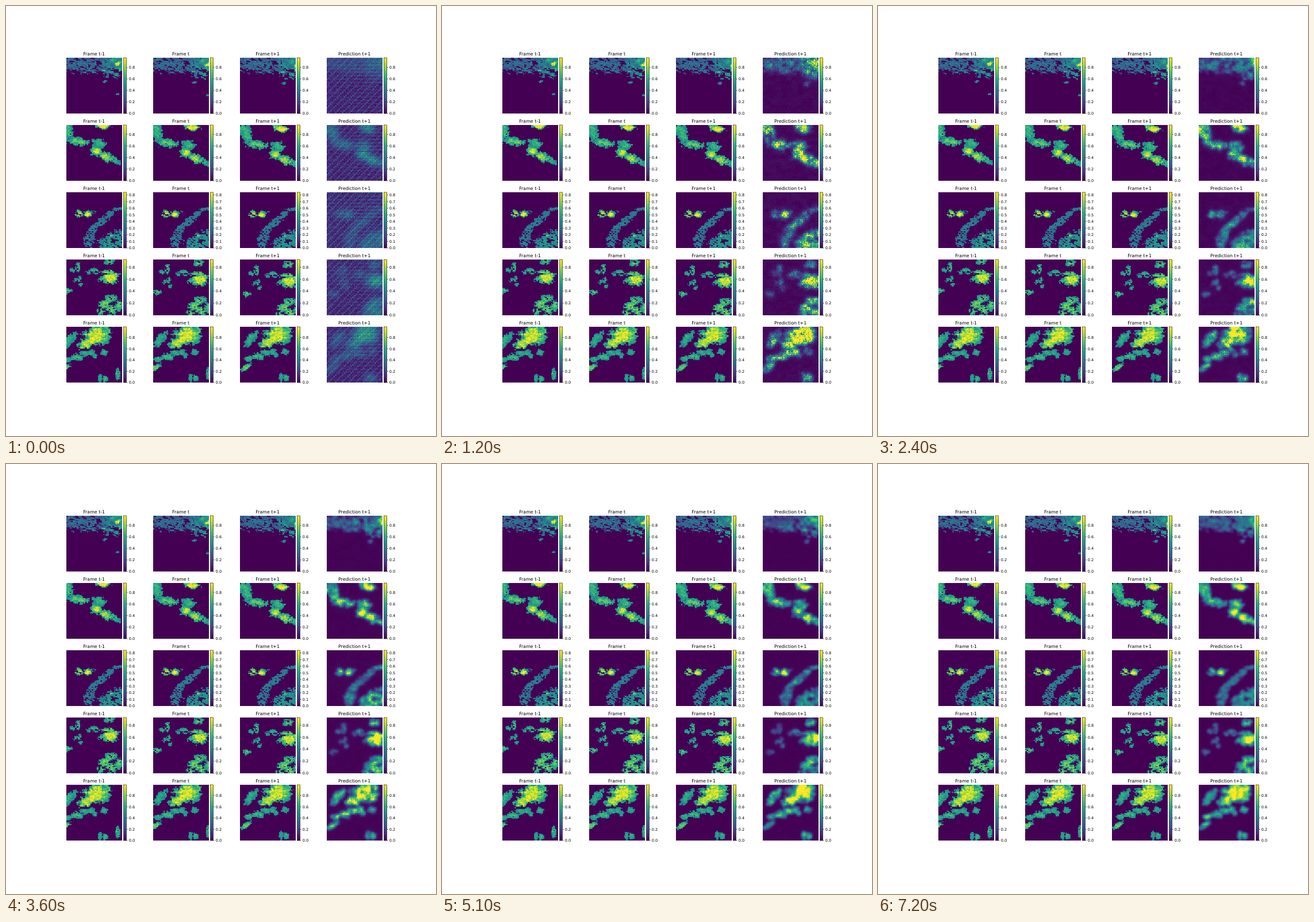
Animation, 748 px wide and 748 px high, one loop 8000 ms. Source, as an HTML page with a canvas:

```html
<!DOCTYPE html>
<html lang="en">
<head>
<meta charset="utf-8">
<title>Frame prediction</title>
<style>
  html, body { margin: 0; width: 100%; height: 100%; overflow: hidden; background: #fff; }
  canvas, svg { position: absolute; left: 0; top: 0; width: 748px; height: 748px; }
  text { font-family: "DejaVu Sans", sans-serif; font-size: 6.55px; fill: #000; }
  .title { font-size: 7.86px; text-anchor: middle; }
</style>
</head>
<body>
<canvas id="maps" width="748" height="748"></canvas>
<svg id="labels" viewBox="0 0 748 748">
  <defs><linearGradient id="scale" x1="0" y1="1" x2="0" y2="0"></linearGradient></defs>
</svg>
<script>
const CELLS = 64, SIZE = 97, LEFT = 105, TOP = 90, STEP_X = 151, STEP_Y = 117;
const STEP_MS = 300, LAST_STEP = 24, LOOP_MS = 8000;
const TITLES = ['Frame t-1', 'Frame t', 'Frame t+1', 'Prediction t+1'];
const STOPS = ['440154', '472d7b', '3b528b', '2c728e', '21918c', '28ae80', '5ec962', 'addc30', 'fde725'];
const RGB = STOPS.map(hex => [0, 2, 4].map(i => parseInt(hex.slice(i, i + 2), 16)));

const clamp = (v, lo = 0, hi = 1) => Math.min(hi, Math.max(lo, v));
const mix = (a, b, t) => a + (b - a) * t;

function viridis(v) {
  const pos = clamp(v) * 8, i = Math.min(7, Math.floor(pos));
  return RGB[i].map((a, k) => mix(a, RGB[i + 1][k], pos - i));
}

function hash(x, y, seed) {
  let h = Math.imul(x, 374761393) ^ Math.imul(y, 668265263) ^ Math.imul(seed + 11, 1274126177);
  h = Math.imul(h ^ h >>> 13, 1103515245);
  h = Math.imul(h ^ h >>> 16, 2246822519);
  return ((h ^ h >>> 15) >>> 0) / 4294967296;
}

function noise(x, y, seed) {
  const ix = Math.floor(x), iy = Math.floor(y);
  const ease = t => t * t * (3 - 2 * t);
  const fx = ease(x - ix), fy = ease(y - iy);
  return mix(mix(hash(ix, iy, seed), hash(ix + 1, iy, seed), fx),
             mix(hash(ix, iy + 1, seed), hash(ix + 1, iy + 1, seed), fx), fy);
}

// Clouds are rough ellipses, placed in panel pixels as seen at time t.
const blob = (x, y, rx, ry, peak = .6, angle = 0) =>
  ({ x, y, rx, ry, peak, cos: Math.cos(angle), sin: Math.sin(angle) });

function streak(x1, y1, x2, y2, width, peak) {
  const length = Math.hypot(x2 - x1, y2 - y1);
  return blob((x1 + x2) / 2, (y1 + y2) / 2, length / 2 + width * .7, width, peak, Math.atan2(y2 - y1, x2 - x1));
}

// Thin torn rain bands along the top edge.
function rainBand(x, y, shift) {
  const depth = y / (24 + 11 * x / SIZE);
  const u = x - shift * 2, w = y - u * .25;
  const torn = noise(u / 3.5, w / 1.8, 5) * .6 + noise(u / 10, w / 5, 6) * .4;
  if (torn < .36 + .3 * depth ** 3 || depth > 1.25) return 0;
  return .2 + .24 * noise(u / 3, w / 2, 8) + .28 * clamp((x - 60) / 32) * noise(u / 5, w / 4, 9);
}

// "tear" is the share of a cloud lost to ragged holes.
const scenes = [
  { max: .97, tick: .2, vx: 5, vy: 1.5, fade: 1, tear: .2, base: rainBand, clouds: [
    blob(96, 11, 8, 4, .95, -.8), blob(87, 5, 10, 5, .55, -.4), blob(70, 24, 4, 2, .7),
    blob(81, 27, 6, 3, .5), blob(72, 43, 4, 2.5, .46), blob(95, 65, 3, 2, .5), blob(76, 35, 4, 2, .4)] },
  { max: .96, tick: .2, vx: 4.5, vy: 2.7, fade: 1, tear: .1, clouds: [
    streak(2, -4, 10, 26, 9, .62), streak(9, 29, 42, 34, 7, .68), streak(-14, -8, 2, 12, 9, .62),
    blob(66, 3, 14, 6, .95, .25), blob(61, 36, 12, 10, .62), blob(57, 49, 11, 8, .85),
    blob(74, 57, 13, 8, .85, .4), streak(82, 58, 95, 69, 5, .6), blob(96, 68, 4, 5, .5)] },
  { max: .84, tick: .1, vx: .3, vy: .4, fade: 1, tear: .3, clouds: [
    blob(22, 37.5, 7, 7, .72), blob(37.5, 38, 7, 7, .86), blob(45, 35, 5, 3, .4),
    streak(37, 98, 40, 76, 9, .35), streak(39, 76, 54, 56, 7, .35), streak(54, 57, 72, 43, 6, .36),
    streak(70, 44, 83, 31, 5, .35), streak(81, 32, 98, 28, 3, .38),
    blob(81, 87, 28, 15, .42, -.3), blob(94, 80, 14, 14, .42), blob(78, 76, 4, 1.5, .65)] },
  { max: .926, tick: .2, vx: 4.5, vy: 3, fade: .45, tear: .28, clouds: [
    blob(81, 34, 15, 12, .88), blob(67, 38, 8, 6, .58), blob(79, 6, 8, 6, .62),
    blob(24, 16, 5, 8, .58), blob(15, 22, 6, 4, .56), blob(27, 37, 4, 6, .56), blob(30, 46, 4, 5, .56),
    blob(54, 23, 9, 5, .58, .25), blob(42, 25, 5, 4, .52), blob(19, 39, 4, 4, .5), blob(7, 57, 7, 5, .62),
    blob(83, 71, 12, 7, .64), blob(71, 82, 12, 8, .7, -.3), blob(64, 94, 8, 6, .65),
    blob(84, 90, 12, 9, .7), blob(95, 82, 7, 9, .65)] },
  { max: .99, tick: .2, vx: 6.5, vy: -.8, fade: 1, tear: .1, clouds: [
    blob(60, 14, 26, 17, .92, -.45), blob(42, 28, 16, 10, .88, -.45), blob(74, 19, 9, 13, .62),
    blob(39, 46, 9, 6, .6), blob(50, 44, 7, 5, .58), blob(24, 52, 11, 6, .64), blob(8, 56, 8, 6, .58),
    streak(3, 32, 20, 13, 7, .58), blob(72, 44, 7, 6, .58), blob(56, 50, 4, 6, .52),
    streak(-5, 77, 12, 66, 4, .74), blob(65, 89, 4, 7, .56), blob(74, 90, 5, 6, .58), blob(96, 81, 4, 11, .66)] }
];

function fill(rule) {
  const out = new Float32Array(CELLS * CELLS);
  for (let k = 0; k < out.length; k++) out[k] = rule(k % CELLS, Math.floor(k / CELLS), k);
  return out;
}

function observe(scene, row, shift) {
  return fill((i, j) => {
    const px = (i + .5) * SIZE / CELLS, py = (j + .5) * SIZE / CELLS;
    const x = px - scene.vx * shift, y = py - scene.vy * shift;
    const rough = (noise(x / 5, y / 4, row) - .5) * .5 + (noise(x / 2.4, y / 1.8, row + 20) - .5) * .5;
    let value = scene.base ? scene.base(px, py, shift) : 0;
    for (const c of scene.clouds) {
      const dx = x - c.x, dy = y - c.y;
      const d = Math.hypot((dx * c.cos + dy * c.sin) / c.rx, (dy * c.cos - dx * c.sin) / c.ry) + rough;
      const torn = c.peak < .73 && noise((x + y) / 5, (y - x * .5) / 2.2, row + 40) < scene.tear;
      const rim = Math.min(.44, c.peak * .8);
      if (d < 1 && !torn) value = Math.max(value, rim + (c.peak - rim) * Math.min(1, (1 - d) * 1.7));
    }
    const texture = noise(x / 3, y / 2.5, row + 60) + hash(i, j, row * 7 + shift) - 1;
    return value * (1 + texture * .22);
  });
}

function blur(source, radius) {
  const pass = (src, sx, sy) => fill((i, j) => {
    let sum = 0;
    for (let d = -radius; d <= radius; d++)
      sum += src[clamp(j + d * sy, 0, CELLS - 1) * CELLS + clamp(i + d * sx, 0, CELLS - 1)];
    return sum / (2 * radius + 1);
  });
  const once = src => pass(pass(src, 1, 0), 0, 1);
  return once(once(source));
}

// A network in training: lattice artefacts, then lumpy guesses, then a soft forecast.
function predict(scene, row, step) {
  const lattice = clamp(1 - step / 3), error = Math.exp(-step / 7);
  const seed = 100 + row * 50 + step;
  const contrast = .3 + .9 * error + .3 * hash(step, 0, 77);
  return fill((i, j, k) => {
    const soft = mix(scene.fine[k], scene.coarse[k], error * .9);
    const lump = noise(i / 4, j / 4, seed) * .6 + noise(i / 9, j / 6, seed + 500) * .4 - .5;
    const checker = (i % 2 ? 1 : -1) + (j % 2 ? 1 : -1);
    const grain = hash(i, j, seed) - .5;
    const fade = mix(scene.fade, 1.1, i / CELLS);
    let value = soft * fade * (1 + .2 * error + lump * 2.2 * contrast);
    value *= 1 + grain * (.12 + 1.1 * error) + checker * .4 * error * error;
    value += .06 * error * (noise(i / 6, j / 4, seed + 9) + grain);
    if (lattice) {
      const diagonal = (i + j) % 8 === 0 || (i + j) % 8 === 1 && j % 2 ? .13 : 0;
      const line = j % 4 === 0 && i % 2 ? .12 : 0;
      const texture = .03 + diagonal + line + .12 * hash(i, j, 3);
      const dots = i % 2 && j % 2 ? 1 : .3 + .35 * hash(i, j, 4);
      value = mix(value, texture + scene.coarse[k] * dots * .7, lattice);
    }
    return value;
  });
}

const ctx = document.getElementById('maps').getContext('2d');
ctx.imageSmoothingEnabled = false;
const tile = document.createElement('canvas');
tile.width = tile.height = CELLS;
const tileCtx = tile.getContext('2d'), pixels = tileCtx.createImageData(CELLS, CELLS);

function paint(values, max, row, col) {
  values.forEach((v, k) => pixels.data.set([...viridis(v / max), 255], k * 4));
  tileCtx.putImageData(pixels, 0, 0);
  ctx.drawImage(tile, LEFT + col * STEP_X, TOP + row * STEP_Y, SIZE, SIZE);
}

const svg = document.getElementById('labels');
function add(name, attrs, text = '', parent = svg) {
  const node = document.createElementNS(svg.namespaceURI, name);
  for (const key in attrs) node.setAttribute(key, attrs[key]);
  node.textContent = text;
  parent.append(node);
}

STOPS.forEach((hex, i) =>
  add('stop', { offset: i / 8, 'stop-color': '#' + hex }, '', document.getElementById('scale')));

scenes.forEach((scene, row) => {
  const y = TOP + row * STEP_Y;
  TITLES.forEach((title, col) => {
    const x = LEFT + col * STEP_X, bar = x + SIZE + 2.5;
    add('text', { class: 'title', x: x + SIZE / 2 - .4, y: y - 4 }, title);
    add('rect', { x: bar, y, width: 5, height: SIZE, fill: 'url(#scale)', stroke: '#000', 'stroke-width': .55 });
    for (let n = 0; n * scene.tick < scene.max; n++) {
      const ty = y + SIZE * (1 - n * scene.tick / scene.max);
      add('path', { d: `M${bar + 5} ${ty}h2.3`, stroke: '#000', 'stroke-width': .55 });
      add('text', { x: bar + 9.3, y: ty + 2.4 }, (n * scene.tick).toFixed(1));
    }
  });
  for (let col = 0; col < 3; col++) {
    const values = observe(scene, row, col - 1);
    paint(values, scene.max, row, col);
    if (col === 2) {
      scene.fine = blur(values, 1);
      scene.coarse = blur(values, 3);
    }
  }
});

let shown = -1;
function draw() {
  const step = Math.min(LAST_STEP, Math.floor(performance.now() % LOOP_MS / STEP_MS));
  if (step !== shown) {
    scenes.forEach((scene, row) => paint(predict(scene, row, step), scene.max, row, 3));
    shown = step;
  }
  requestAnimationFrame(draw);
}
draw();
</script>
</body>
</html>
```
